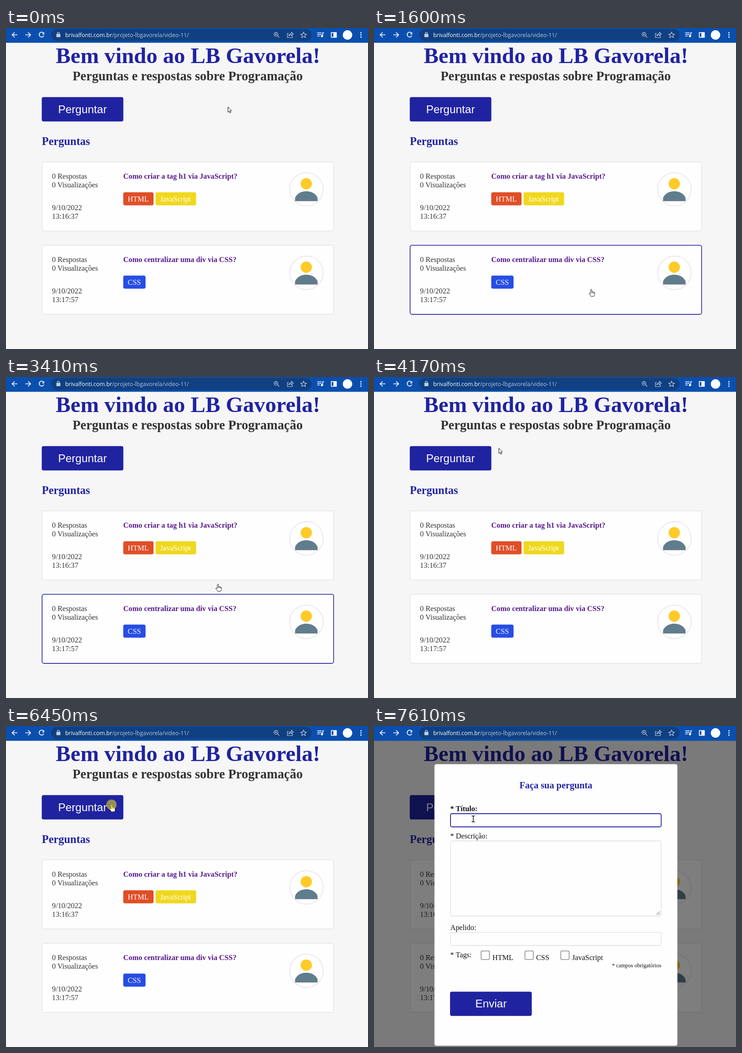
Write an HTML page that moves like this. It is 795 px wide and 705 px high and loops after 8000 ms.

```html
<!DOCTYPE html>
<html lang="pt-BR">
<head>
<meta charset="utf-8">
<title>Perguntas</title>
<style>
  html, body { margin: 0; width: 100%; height: 100%; overflow: hidden; background: #f6f6f7; }
  svg { display: block; width: 795px; height: 705px; }
  text { font: 16.25px "Liberation Serif", "Times New Roman", serif; fill: #333; white-space: pre; }
  .bold { font-weight: bold; }
  .brand { fill: #2023a0; }
  .h1 { font-size: 48.7px; }
  .h2 { font-size: 28.45px; }
  .h3 { font-size: 24.4px; }
  .h4 { font-size: 20.3px; }
  .small { font-size: 12.2px; }
  .link { fill: #551a8b; }
  .light { fill: #fff; }
  .button { font: 24.4px "Liberation Sans", Arial, sans-serif; fill: #fff; }
  .url { font: 12.4px "Open Sans", sans-serif; fill: #fff; }
  .path { fill: #b5c5dc; }
  .card { fill: #fefefe; stroke: #e6e6e8; stroke-width: 1.6; }
  .card.hover { stroke: #2023a0; }
  .field { fill: #fefefe; stroke: #dedee0; stroke-width: 1.3; }
  .focus { stroke: #2023a0; stroke-width: 1.8; }
  .check { fill: #fff; stroke: #767676; stroke-width: 1.3; }
  .icon { fill: none; stroke: #fff; stroke-width: 1.7; }
  .icon.faint { stroke: #c3d0e4; stroke-width: 1.2; }
  #modal text { fill: #111; }
  #modal .brand { fill: #2023a0; }
  #modal .button { fill: #fff; }
</style>
</head>
<body>
<svg viewBox="0 0 795 705">
  <defs>
    <g id="avatar">
      <circle r="36.8" fill="#fff" stroke="#eeebf0" stroke-width="2.4"/>
      <circle cx="-.3" cy="-12.5" r="12.4" fill="#ffca28"/>
      <path d="M-25 25.5V18.5C-21 9 -11 4 -.3 4S20.5 9 24.5 18.5V25.5Z" fill="#607d8b"/>
      <path d="M-25 26H24.5" stroke="#dccbdc"/>
    </g>
  </defs>

  <rect width="795" height="705" fill="#f6f6f7"/>
  <text class="bold brand h1" x="109.3" y="77">Bem vindo ao LB Gavorela!</text>
  <text class="bold h2" x="146.2" y="114.8">Perguntas e respostas sobre Programação</text>
  <rect class="brand" x="78.5" y="151.7" width="179.2" height="53.5" rx="4"/>
  <text class="button" x="114.4" y="186.5">Perguntar</text>
  <text class="bold brand h3" x="78.8" y="257">Perguntas</text>
  <g id="cards"></g>

  <g id="modal">
    <rect y="32" width="795" height="673" fill="#000" opacity=".5"/>
    <rect x="133" y="84" width="533" height="618" rx="4" fill="#fefefe" stroke="#ddd" stroke-width=".8"/>
    <text class="bold brand h4" x="399.5" y="137" text-anchor="middle">Faça sua pergunta</text>
    <text class="bold" x="167.5" y="187.3">* Título:</text>
    <rect class="field focus" x="168" y="192.5" width="462.7" height="29" rx="3.5"/>
    <text x="167.5" y="247.3">* Descrição:</text>
    <rect class="field" x="168" y="252.5" width="462.7" height="165" rx="3.5"/>
    <path d="M620.5 414.5L627.5 407.5M625 414.5L628 411.5" stroke="#444"/>
    <text x="167.5" y="448">Apelido:</text>
    <rect class="field" x="168" y="453.3" width="462.7" height="28.7" rx="3.5"/>
    <text x="167.5" y="508">* Tags:</text>
    <rect class="check" x="235.2" y="494.2" width="18.3" height="18.6" rx="2.5"/>
    <text x="260" y="514">HTML</text>
    <rect class="check" x="331.5" y="494.2" width="18.3" height="18.6" rx="2.5"/>
    <text x="356" y="514">CSS</text>
    <rect class="check" x="410.2" y="494.2" width="18.3" height="18.6" rx="2.5"/>
    <text x="435" y="514">JavaScript</text>
    <text class="small" x="631" y="530" text-anchor="end">* campos obrigatórios</text>
    <rect class="brand" x="167" y="583.5" width="179.5" height="53.3" rx="4"/>
    <text class="button" x="257" y="618" text-anchor="middle">Enviar</text>
  </g>

  <rect width="795" height="32.5" fill="#0b4fae"/>
  <rect x="99" y="2" width="572" height="26.5" rx="13.2" fill="#104080"/>
  <g class="icon">
    <path d="M25 15H13.5M19 9.5L13.5 15L19 20.5"/>
    <path d="M42.5 15H54M48.5 9.5L54 15L48.5 20.5"/>
    <path d="M82.6 11.3A5.4 5.4 0 1 0 83.3 16.5"/>
    <path d="M84 9V14H79Z" fill="#fff" stroke="none"/>
    <path d="M683.5 10.5H693M683.5 14H693M683.5 17.5H689M695.5 18V10.5H698.5"/>
    <circle cx="693.8" cy="18" r="1.6" fill="#fff"/>
    <rect x="714.5" y="10" width="11" height="10.5"/>
    <path d="M722 10V20.5" stroke-width="6"/>
  </g>
  <g class="icon faint">
    <rect x="111.3" y="13.5" width="7.5" height="6" fill="#c3d0e4"/>
    <path d="M112.8 13.5V11.5A2.2 2.2 0 0 1 117.2 11.5V13.5"/>
    <circle cx="592.8" cy="13.8" r="4.2"/>
    <path d="M596 17L600 21M590.8 13.8H594.8M592.8 11.8V15.8"/>
    <path d="M621 12H618V21H629V17.5M621 17.5C621.5 14 624 12.5 627 12.5V9.5L631 13.5L627 17V14.8C624.5 14.8 622.5 15.5 621 17.5Z"/>
    <path d="M653.5 9L655.3 13.2L659.8 13.6L656.4 16.5L657.4 21L653.5 18.6L649.6 21L650.6 16.5L647.2 13.6L651.7 13.2Z"/>
  </g>
  <circle cx="750" cy="15.3" r="10.5" fill="#fff"/>
  <path d="M779.5 10.5V20.5" stroke="#fff" stroke-width="3" stroke-dasharray="0 4.7" stroke-linecap="round"/>
  <text class="url" x="130" y="20">brivalfonti.com.br<tspan class="path">/projeto-lbgavorela/video-11/</tspan></text>

  <g id="cursor" stroke="#111" stroke-linejoin="round">
    <path id="arrow" d="M.5 .5V12L3.1 9.6L4.9 13.7L6.8 12.9L5 8.9H8.6Z" fill="#fff" stroke-width="1"/>
    <path id="hand" d="M-1.3 9.5V1.3Q-1.3 0 0 0T1.3 1.3V5.5Q2.5 4.5 3.8 5.9Q5 5 6 6.4Q7.7 5.9 7.7 7.8V10.5Q7.7 13 6 15.5H-.5Q-2 13 -4.3 10.2Q-5 8.3 -3.3 8.3Q-2.2 8.3 -1.3 9.5ZM1.3 5.5V8.5M3.8 6V8.7M6 6.5V9" fill="#fff" stroke-width=".9"/>
    <path id="beam" d="M-3.5 -6.5H-1Q0 -6.5 0 -5.5V5.5Q0 6.5 -1 6.5H-3.5M3.5 -6.5H1Q0 -6.5 0 -5.5M0 5.5Q0 6.5 1 6.5H3.5" fill="none" stroke-width="1.5"/>
  </g>
  <circle id="click" cx="231.7" cy="172.7" r="11.3" fill="#fff014" opacity=".52"/>
</svg>
<script>
const LOOP = 8000, STEP = 69.2, CLICK = 6450, OPEN = 6650;
const $ = id => document.getElementById(id);

const tag = (x, y, width, color, label) =>
  `<rect x="${x}" y="${y}" width="${width}" height="28.8" rx="4" fill="${color}"/>
   <text class="light" x="${x + 9.8}" y="${y + 20}">${label}</text>`;

const card = (y, title, time, tags) =>
  `<rect class="card" x="79.3" y="${y}" width="640.2" height="151.7" rx="4"/>
   <text x="101" y="${y + 37}">0 Respostas</text>
   <text x="101" y="${y + 56.2}">0 Visualizações</text>
   <text x="101" y="${y + 106}">9/10/2022</text>
   <text x="101" y="${y + 125.2}">${time}</text>
   <text class="bold link" x="257.6" y="${y + 37}">${title}</text>
   <use href="#avatar" x="659.8" y="${y + 60.5}"/>${tags}`;

$('cards').innerHTML =
  card(294, 'Como criar a tag h1 via JavaScript?', '13:16:37',
    tag(257.5, 360.7, 66.5, '#e04e27', 'HTML') + tag(328.6, 360.7, 89, '#f0d81e', 'JavaScript')) +
  card(477.2, 'Como centralizar uma div via CSS?', '13:17:57',
    tag(257.5, 543.7, 49, '#264de4', 'CSS'));
const cards = [...document.querySelectorAll('.card')];

// Pointer path: time, x, y
const path = [
  [0, 487, 173], [450, 440, 212], [896, 389, 250.5], [1180, 408, 330], [1400, 450, 510],
  [1600, 478, 574], [1800, 500, 540], [2100, 535, 350], [2350, 525, 237], [2560, 512, 203],
  [2800, 505, 290], [3100, 485, 510], [3240, 478, 545], [3390, 465.5, 455.5], [3650, 400, 330],
  [3950, 320, 210], [4150, 274, 156], [4450, 215, 172], [4750, 185, 182], [4980, 154, 178],
  [5120, 170, 176.5], [5450, 200, 186], [5800, 211, 188], [6000, 243, 178], [6150, 232, 173],
  [7270, 232, 173], [7540, 218, 204], [LOOP, 218, 204]
];

// Slope is flat at turning points, so the curve never overshoots
function slope(i, axis) {
  const a = path[i - 1], b = path[i], c = path[i + 1];
  if (!a || !c || (b[axis] - a[axis]) * (c[axis] - b[axis]) <= 0) return 0;
  return (c[axis] - a[axis]) / (c[0] - a[0]);
}

function pointer(t) {
  const i = Math.max(0, path.findIndex(p => p[0] > t) - 1);
  const a = path[i], b = path[i + 1], span = b[0] - a[0], u = (t - a[0]) / span;
  return [1, 2].map(k =>
    a[k] + (b[k] - a[k]) * u * u * (3 - 2 * u) +
    span * u * (1 - u) * (slope(i, k) * (1 - u) - slope(i + 1, k) * u));
}

const inside = ([x, y], left, top, right, bottom) =>
  x >= left && x <= right && y >= top && y <= bottom;

const show = (id, on) => $(id).style.display = on ? '' : 'none';

function draw(t) {
  const tick = Math.floor(t / STEP) * STEP;
  const open = t >= OPEN;
  const at = pointer(tick);
  const before = pointer(Math.max(0, tick - STEP)); // hover trails the pointer by one step
  const hovers = [[294, 446], [477, 629]].map(([top, bottom]) =>
    !open && inside(before, 79, top, 720, bottom));
  cards.forEach((el, i) => el.classList.toggle('hover', hovers[i]));

  const hand = !open && (hovers.includes(true) || inside(before, 79, 152, 258, 205));
  const beam = open && at[1] >= 192;
  show('hand', hand);
  show('beam', beam);
  show('arrow', !hand && !beam);
  show('modal', open);
  show('click', t >= CLICK && !open);
  $('cursor').setAttribute('transform', `translate(${at})`);
}

const start = performance.now();
function frame() {
  draw((performance.now() - start) % LOOP);
  requestAnimationFrame(frame);
}
frame();
</script>
</body>
</html>
```
